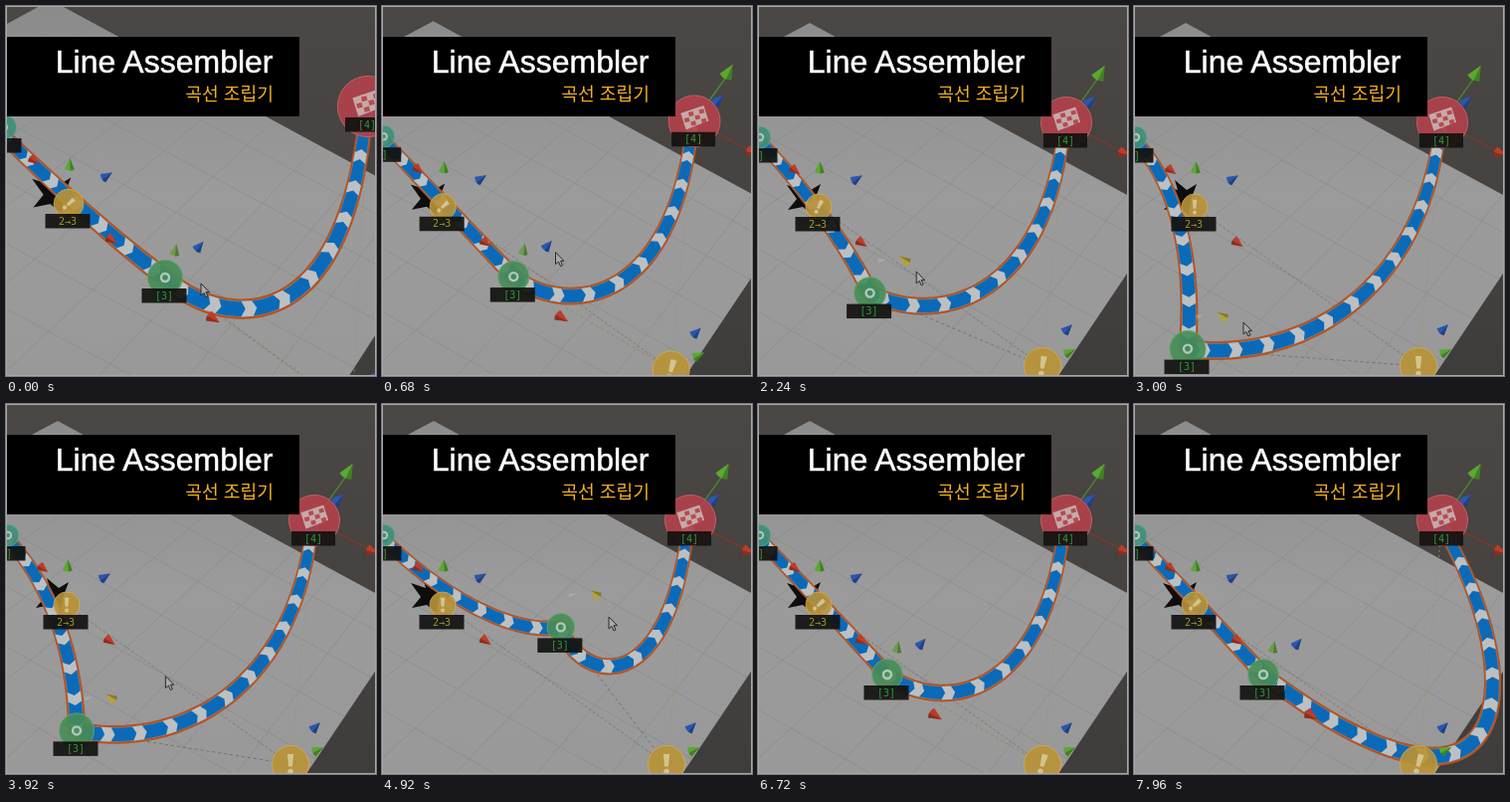
An HTML page that plays this animation: 372 by 372 pixels, repeating every 8 s.

```html
<!DOCTYPE html>
<html lang="ko">
<head>
<meta charset="utf-8">
<style>
html, body { margin: 0; width: 100%; height: 100%; overflow: hidden; background: #464341; }
svg { display: block; width: 100vw; height: 100vh; }
.title { font: 32px "Liberation Sans", Arial, sans-serif; fill: #fff; stroke: #fff; stroke-width: .5; }
.sub { font: 300 18.2px "Noto Sans CJK KR", "Noto Sans CJK", sans-serif; fill: #f5b01c; }
.tag { font: 10px "DejaVu Sans Mono", monospace; text-anchor: middle; }
</style>
</head>
<body>
<svg viewBox="0 0 372 372">
  <defs>
    <linearGradient id="floor" gradientUnits="userSpaceOnUse" x1="0" y1="0" x2="0" y2="372">
      <stop offset="0" stop-color="#8b8b8b"/><stop offset=".5" stop-color="#9b9b9b"/><stop offset="1" stop-color="#999"/>
    </linearGradient>
    <linearGradient id="back" x1="0" y1="0" x2="0" y2="1">
      <stop offset="0" stop-color="#4b4744"/><stop offset="1" stop-color="#3f3d3c"/>
    </linearGradient>
  </defs>
  <rect width="372" height="372" fill="url(#back)"/>
  <g id="scene"></g>
  <rect y="31" width="295" height="80" fill="#000"/>
  <text class="title" x="268.5" y="67" text-anchor="end">Line Assembler</text>
  <text class="sub" x="269" y="94.5" text-anchor="end">곡선 조립기</text>
  <rect x=".5" y=".5" width="371" height="371" fill="none" stroke="#a6a6a6"/>
</svg>
<script>
const LOOP = 8000;
const scene = document.getElementById('scene');
const clamp = v => Math.max(0, Math.min(1, v));
const smooth = v => (v = clamp(v), v * v * (3 - 2 * v));
const mix = (a, b, k) => a + (b - a) * k;
const mixP = (a, b, k) => [mix(a[0], b[0], k), mix(a[1], b[1], k)];
const pts = list => list.map(p => p[0].toFixed(1) + ',' + p[1].toFixed(1)).join(' ');
const poly = (list, fill, extra = '') => `<polygon points="${pts(list)}" fill="${fill}" ${extra}/>`;
const line = (a, b, color, width = 1, dash = '') =>
  `<path d="M${pts([a])}L${pts([b])}" stroke="${color}" stroke-width="${width}" stroke-dasharray="${dash}"/>`;

// Eased value of a [time, ...values] track
function track(keys, t) {
  let i = 0;
  while (i < keys.length - 2 && t >= keys[i + 1][0]) i++;
  const [a, b] = [keys[i], keys[i + 1]];
  const k = smooth((t - a[0]) / (b[0] - a[0]));
  return a.slice(1).map((v, j) => mix(v, b[j + 1], k));
}

const DRAG = [[950, 130], [1400, 163], [1600, 163], [2950, 54], [3600, 54], [5000, 181], [5700, 130]];
const CURSOR = [[0, 196, 279], [850, 172, 244], [950, 172, 244], [1360, 212, 212], [1550, 212, 212],
  [2900, 110, 318], [3100, 110, 318], [4920, 228, 214], [5700, 172, 245]];

function bezier(a, b, c, d, n) {
  return Array.from({ length: n }, (_, i) => {
    const t = i / n, s = 1 - t;
    return [0, 1].map(j => s*s*s*a[j] + 3*s*s*t*b[j] + 3*s*t*t*c[j] + t*t*t*d[j]);
  });
}

function floor(cam) {
  const A = mixP([52, 17], [45, -6], cam), B = mixP([410, 211], [448, 212], cam);
  const C = mixP([150, 598], [190, 612], cam), D = mixP([-420, 270], [-460, 270], cam);
  let out = poly([A, B, C, D], 'url(#floor)');
  const n = 9;
  for (let i = 1; i < n; i++) {
    const k = i / n, deep = k ** 1.2;
    out += line(mixP(A, D, deep), mixP(B, C, deep), '#8a8a8a', .7);
    out += line(mixP(A, B, k), mixP(D, C, k), '#8a8a8a', .7);
  }
  return out;
}

// Striped road with chevrons that run along the curve
function road(path, time, cam) {
  let u = 0;
  const zoom = 1 + .14 * cam;
  const rows = path.map((p, i) => {
    const a = path[Math.max(0, i - 1)], b = path[Math.min(path.length - 1, i + 1)];
    const len = Math.hypot(b[0] - a[0], b[1] - a[1]) || 1;
    const h = (4.5 + p[1] * .0115) * zoom;
    if (i) u += Math.hypot(p[0] - a[0], p[1] - a[1]) / ((24 + p[1] * .025) * zoom);
    return { p, n: [(a[1] - b[1]) / len, (b[0] - a[0]) / len], h, u };
  });
  const side = (r, k) => [r.p[0] + r.n[0] * r.h * k, r.p[1] + r.n[1] * r.h * k];
  const strip = (k, fill) =>
    poly([...rows.map(r => side(r, k)), ...rows.map(r => side(r, -k)).reverse()], fill);
  const at = (v, k) => {
    let i = rows.findIndex(r => r.u >= v);
    if (i < 0) i = rows.length - 1;
    if (i < 1) return side(rows[0], k);
    const a = rows[i - 1], b = rows[i];
    return mixP(side(a, k), side(b, k), clamp((v - a.u) / (b.u - a.u || 1)));
  };
  let out = strip(1.12, '#b9511c') + strip(.88, '#6f7f8c') + strip(.8, '#0b6ab8');
  for (let v = (time / 800) % 1 - 1; v < u; v++) {
    out += poly([at(v, -.86), at(v + .12, 0), at(v, .86),
      at(v + .32, .86), at(v + .44, 0), at(v + .32, -.86)], '#bcc0c2');
  }
  return out;
}

function cone(x, y, angle, color, size = 1) {
  return `<g transform="translate(${x.toFixed(1)} ${y.toFixed(1)}) rotate(${angle}) scale(${size})">
    <path d="M0-7L5 4Q0 7-5 4Z" fill="${color}"/><path d="M0-7L5 4Q3 5.5 1 5.7Z" fill="#000" opacity=".25"/></g>`;
}
const GREEN = '#5aa832', BLUE = '#2c56ae', RED = '#bd3c28', GOLD = '#b5a335';

function disc([x, y], r, fill, rim, icon) {
  return `<g transform="translate(${x.toFixed(1)} ${y.toFixed(1)})">
    <circle r="${r.toFixed(1)}" fill="${fill}" stroke="${rim}" opacity=".9"/>${icon}</g>`;
}

function tag([x, y], text, color, w = 45) {
  return `<rect x="${x - w / 2}" y="${y - 7}" width="${w}" height="14.5" fill="#131311" opacity=".93"/>
    <text class="tag" x="${x}" y="${y + 3.5}" fill="${color}">${text}</text>`;
}

const bang = (angle, s) => `<g transform="rotate(${angle}) scale(${s})" fill="#d3c48f">
  <path d="M-2.5-8H2.5L1.5 2H-1.5Z"/><circle cy="6" r="2.2"/></g>`;
const ring = s => `<circle r="${4 * s}" fill="none" stroke="#b3c9b8" stroke-width="${2.4 * s}"/>`;

function flag(s, angle) {
  let out = `<g transform="rotate(${angle}) scale(${s})"><path d="M-12-8L12-10L13 6L-11 9Z" fill="#c5a9a9"/>`;
  for (let i = 0; i < 12; i++) {
    if ((i + (i >> 2)) % 2) out += `<rect x="${-10 + i % 4 * 5.4}" y="${-7 + (i >> 2) * 4.8}" width="4.8" height="4.2" fill="#b54b50"/>`;
  }
  return out + '</g>';
}

function draw(t) {
  const cam = 1 - smooth(t / 820);
  const zoom = 1 + .15 * cam;
  const x3 = track(DRAG, t)[0], dx = x3 - 54;
  const held = t > 950 && t < 5750;
  const swing = smooth((t - 6800) / 950);
  const shift = (x, y, sx, sy) => [x + sx * cam, y + sy * cam];

  const n1 = shift(2, 132, -4, -10), n2 = shift(61, 202, 2, -3);
  const n3 = shift(x3, 272 - (x3 - 130) * .955, 30, 1);
  const n4 = shift(310, 117, 54, -16), n5 = shift(286, 362, 62, 46);
  const end = [n4[0] - 2, n4[1] + 4];

  const left = bezier(shift(0, 134, -5, -6), shift(35, 170, 3, 0),
    shift(62 + dx * .44, 235, 18, 5), n3, 36);
  const right = bezier(n3,
    mixP(shift(150 + dx * .37, 358 - dx * .635, 33, 12), [380, 462], swing),
    mixP(shift(288, 304, 54, 41), [405, 285], swing), end, 64);
  const path = [...left, ...right, end];

  let out = floor(cam);
  out += line(n2, n5, '#747474', .8, '3 2') + line(n3, n5, held ? '#6e6e6c' : '#8f8a55', .9, '3 3');
  out += line(n4, n5, '#98966a', .9, '2 3');

  const star = [[-32, -22], [-17, -17], [-20, -27], [-8, -17], [2, -23], [-4, -7], [-6, 8], [-16, 0], [-31, 3], [-22, -8]];
  out += poly(star.map(p => [n2[0] + p[0] * zoom, n2[1] + p[1] * zoom]), '#0d0d0d');
  out += road(path, t, cam);

  const tilt = mix(0, 48, clamp(1 - Math.abs(x3 - 130) / 40));
  out += disc(n1, 11 * zoom, '#3f8f78', '#65a894', ring(.8));
  out += tag([n1[0] - 5, n1[1] + 18], '[1]', '#2f9a3c');
  out += disc(n2, 13 * zoom, '#b99238', '#cdaa52', bang(tilt, .9));
  out += tag([n2[0] - 1, n2[1] + 17], '2→3', '#9c9a2c');
  out += disc(n3, (6 + n3[1] * .035) * (1 + .14 * cam), '#468d57', '#64a473', ring(1));
  out += tag([n3[0] - 1, n3[1] + 18], '[3]', '#2f9a3c');
  out += disc(n5, 18.5, '#ba9335', '#cdaa52', bang(tilt / 3, 1.25));

  // Axis handles
  const [a, b] = n4;
  out += line(n4, [a + 33, b - 46], '#4a972e', 1.2) + line(n4, [a + 57, b + 30], '#9c2f22', 1);
  out += cone(a + 24, b - 21, 45, BLUE, 1.1);
  out += disc(n4, 25.5 * (1 + .2 * cam), '#b3414a', '#c8646a', '');
  out += `<g transform="translate(${a} ${b - 3})">${flag(zoom, -14)}</g>`;
  out += tag([a - 1, b + 18], '[4]', '#2f9a3c', 44);
  out += cone(a + 34, b - 49, 30, GREEN, 1.35) + cone(a + 58, b + 31, 108, RED, 1.1);

  out += cone(n1[0] + 35 - 5 * cam, n1[1] + 33, 128, RED, .95);
  out += cone(n2[0] + 1, n2[1] - 39, 3, GREEN) + cone(n2[0] + 38, n2[1] - 28, 58, BLUE);
  out += cone(n2[0] + 43, n2[1] + 36, 125, RED);
  out += cone(n5[0] + 25, n5[1] - 37, 45, BLUE) + cone(n5[0] + 27, n5[1] - 14, 65, GREEN);

  const [x, y] = n3;
  if (held) {
    out += `<g opacity=".3">${cone(x + 12, y - 32, 65, '#c9c9c9', .7)}</g>`;
    out += cone(x + 35, y - 33, -55, GOLD, .95);
  } else {
    out += cone(x + 10, y - 27, 10, '#6f9d4c') + cone(x + 34, y - 31, 40, BLUE);
    out += cone(x + 48, y + 41, 122, RED, 1.15);
  }
  if (t < 5900) {
    const c = track(CURSOR, t);
    out += `<path transform="translate(${c[0].toFixed(1)} ${c[1].toFixed(1)})" d="M0 0V12L3 9.5L5 14L7 13L5 8.7H8.5Z" fill="#a9a9a9" stroke="#2b2b2b"/>`;
  }
  scene.innerHTML = out;
}

const start = performance.now();
function tick() {
  draw((performance.now() - start) % LOOP);
  requestAnimationFrame(tick);
}
tick();
</script>
</body>
</html>
```
